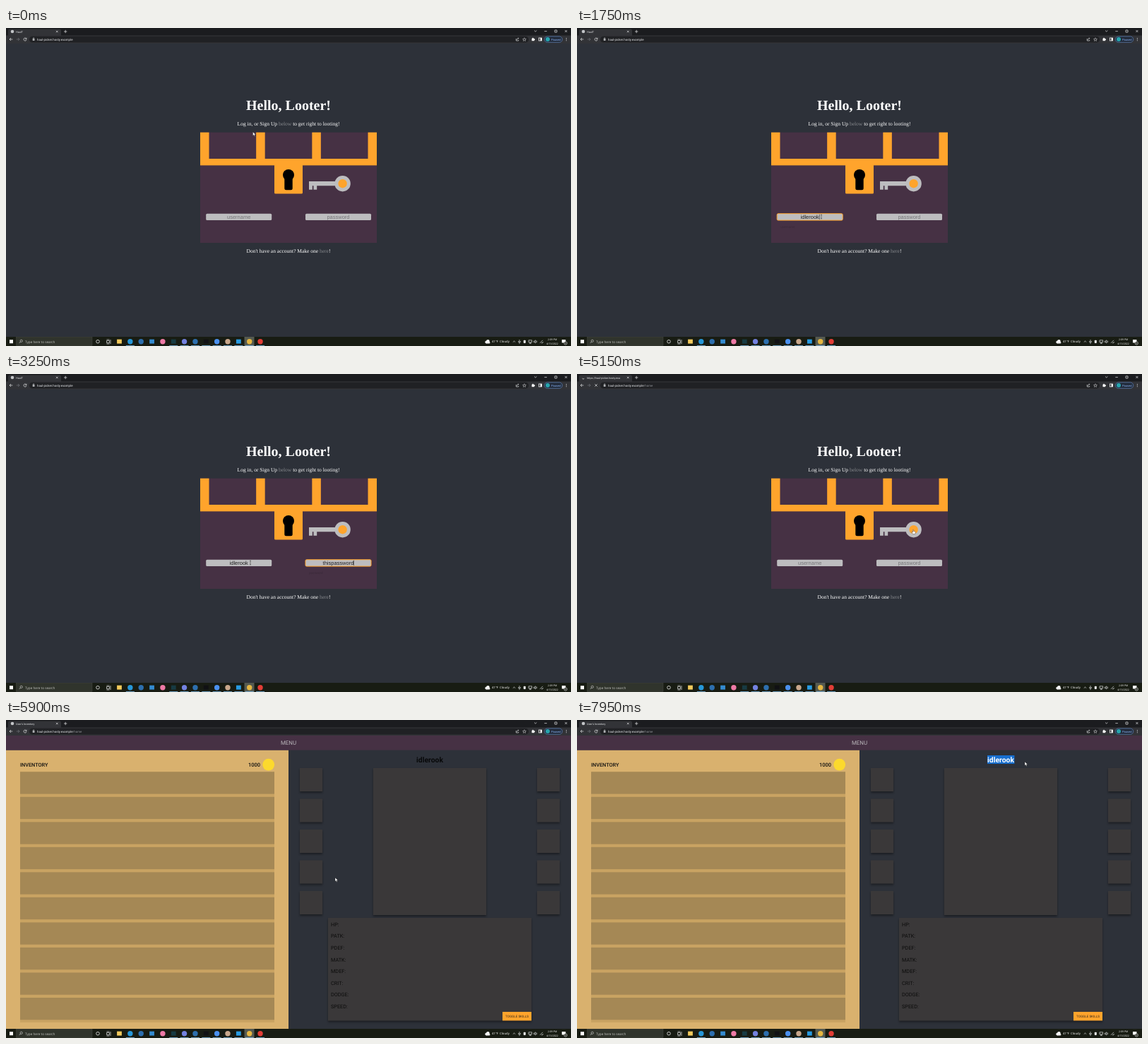
These frames come from a looping animation (800 px wide and 450 px high, 8000 ms). An HTML page:

```html
<!DOCTYPE html>
<html lang="en">
<head>
<meta charset="utf-8">
<title>Treasure login</title>
<style>
html, body { margin: 0; width: 100%; height: 100%; overflow: hidden; background: #2d3139; }
svg { display: block; width: 100vw; height: 100vh; }
text { font-family: Roboto, sans-serif; text-rendering: geometricPrecision; white-space: pre; }
.serif { font-family: "Liberation Serif", serif; }
.arial { font-family: "Liberation Sans", sans-serif; }
.ui { font-family: "Open Sans", sans-serif; }
.line { fill: none; stroke: #e4e5e7; stroke-width: .7; }
.shadow { filter: drop-shadow(0 2px 1.5px rgba(0, 0, 0, .4)); }
</style>
</head>
<body>
<svg id="stage" viewBox="0 0 800 450"></svg>
<script>
const LOOP = 8000;
const HOST = 'haul-picker.hosty.example';
const USER = 'idlerook';
const PASSWORD = 'thispassword';
const PLUM = '#463144', ORANGE = '#ffa42c', SILVER = '#bdbdbf', PANEL = '#3a3839';

const rect = (x, y, w, h, fill, extra = '') =>
  `<rect x="${x}" y="${y}" width="${w}" height="${h}" fill="${fill}" ${extra}/>`;
const circle = (x, y, r, fill, extra = '') =>
  `<circle cx="${x}" cy="${y}" r="${r}" fill="${fill}" ${extra}/>`;
const line = (d, extra = '') => `<path class="line" d="${d}" ${extra}/>`;
const text = (x, y, size, content, fill, extra = '') =>
  `<text x="${x}" y="${y}" font-size="${size}" fill="${fill}" ${extra}>${content}</text>`;
const centered = (x, y, size, content, fill, extra = '') =>
  text(x, y, size, content, fill, `text-anchor="middle" ${extra}`);
const repeat = (n, make) => Array.from({ length: n }, (_, i) => make(i)).join('');

function browser() {
  return rect(0, 0, 800, 11, '#1b1c1f') +
    rect(3, 1.5, 75, 12, '#323337', 'rx="2.5"') +
    rect(0, 10.5, 800, 11.5, '#323337') +
    rect(33, 11.8, 707, 8.8, '#202124', 'rx="4.4"') +
    `<g id="favicon">${circle(9, 5, 2.3, '#c3c5c8')}</g>` +
    line('M11 5A2 2 0 0 1 9 7', 'id="spinner"') +
    text(14, 6.5, 3.75, '', '#e4e5e7', 'id="tabTitle"') +
    line('M71 3.8l2.5 2.5m0-2.5l-2.5 2.5M82 5h4.4m-2.2-2.2v4.4') +
    line('M748 3.5l1.7 1.6 1.7-1.6M762.3 4.6h3.6M777 3h3v3h-3zM791.4 3l3 3m0-3l-3 3') +
    line('M9.3 16H5m2-2l-2 2 2 2') +
    line('M14.8 16h4.3m-2-2l2 2-2 2', 'id="forward"') +
    line('M28.6 14.8A2 2 0 1 0 29 16.5M29 13.8v1.7h-1.7', 'id="reload"') +
    line('M25.3 14.3l3.4 3.4m0-3.4l-3.4 3.4', 'id="stop"') +
    rect(37.7, 15.5, 2.8, 2.3, '#c3c5c8') + line('M38.3 15.5v-1.1q.8-1 1.6 0v1.1', 'stroke-width=".5"') +
    text(44, 17.6, 4.4, `${HOST}<tspan id="path" fill="#8f9297"></tspan>`, '#e8eaed') +
    line('M722.3 15v3h3.4v-1m-2-.4q.2-2 2-2m-.9-.9l1 .9-1 1') +
    line('M734 13.8l.7 1.6 1.7.2-1.3 1.1.4 1.7-1.5-.9-1.5.9.4-1.7-1.3-1.1 1.7-.2z', 'style="stroke-width:.5"') +
    rect(744.5, 14.8, 3.6, 3.4, '#fff') + circle(746, 14.6, .8, '#fff') + circle(748.3, 16.3, .8, '#fff') +
    rect(754.5, 14, 4, 4, 'none', 'stroke="#fff" stroke-width=".7"') + rect(756.6, 14, 2, 4, '#fff') +
    rect(762.3, 11.9, 25.4, 8.4, '#222b3a', 'rx="4.2" stroke="#668fce" stroke-width=".6"') +
    circle(767, 16.1, 3, '#27a4ad') + text(772, 17.6, 4.1, 'Paused', '#8ab4f8') +
    repeat(3, i => circle(793.3, 14.4 + i * 1.7, .5, '#e4e5e7'));
}

function taskbar() {
  const apps = ['#f3ca5c', '#2697d8', '#2d6fae', '#348bd0', '#ef7aa6', '#173b43', '#7381df',
    '#2d6fae', '#101114', '#4b91ef', '#c9a78b', '#279be2', '#e6b741', '#e23d36'];
  return rect(0, 437, 800, 13, '#181c13') +
    rect(5, 441.2, 5, 5, '#fff') +
    rect(14.5, 437.5, 107.5, 12, '#30342c', 'stroke="#50534c" stroke-width=".4"') +
    circle(21.7, 442.8, 1.6, 'none', 'stroke="#ddd" stroke-width=".6"') + line('M20.6 444l-1.7 1.8') +
    text(27, 445.6, 4.65, 'Type here to search', '#c7c8c4', 'class="ui"') +
    circle(130, 443.7, 2.3, 'none', 'stroke="#fff" stroke-width=".7"') +
    line('M142.5 442.5h4v3h-4zM142.5 441h4M142.5 447h4M148 441v6') +
    rect(337.5, 437, 14, 13, '#555a51') +
    apps.map((color, i) => {
      const x = 160.5 + i * 15.35;
      const shape = i === 0 || i === 3 || i === 5 || i === 8 || i === 11
        ? rect(x - 3.4, 440.6, 6.8, 6, color) : circle(x, 443.7, 3.7, color);
      return shape + (i === 1 || i > 4 ? rect(x - 6, 449.2, 12, .8, '#83bce7') : '');
    }).join('') +
    circle(680.3, 444.4, 2, '#eee') + circle(682.4, 443.4, 2.3, '#fff') + rect(679.8, 444, 5.5, 2.4, '#eee', 'rx="1.2"') +
    text(688, 445.4, 4.3, '41°F', '#fff', 'class="ui"') + text(699, 445.4, 4.3, 'Cloudy', '#fff', 'class="ui"') +
    line('M717.8 444.6l1.7-1.6 1.7 1.6M727 441v3m-1.3-1v1.5h2.6V443M727 445v2') +
    rect(732.8, 441.7, 3, 4.4, '#eee', 'rx=".8"') +
    line('M740 441.8h4.6v3H740zm2.3 3v1.5m-1.5 0h3M747.4 443v1.7h1l1.4 1.1v-4l-1.4 1.2zM751 442.4q1.2 1.4 0 2.8M756 445.8l4-4m-2 4q2.6.2 2.5-1.8') +
    centered(773.6, 442.4, 3.5, '2:09 PM', '#fff', 'class="ui"') +
    centered(773.6, 448.2, 3.5, '4/13/2022', '#fff', 'class="ui"') +
    rect(787, 441, 5.4, 4.4, '#fff') + circle(792.3, 446, 2.2, '#22261e', 'stroke="#fff" stroke-width=".5"') +
    centered(792.3, 447.2, 3, '2', '#fff');
}

const field = (id, x) =>
  rect(x, 262.7, 93, 9.4, SILVER, `rx="1.6" id="${id}Box"`) +
  centered(x + 46.5, 269.9, 7.5, '', '#222', `class="arial" id="${id}Text"`) +
  rect(0, 263.7, .5, 7.4, '#111', `id="${id}Caret"`) +
  text(x + 5, 282.8, 4.6, id, '#3a2a39', `class="arial" id="${id}Hint"`);

function loginPage() {
  const link = word => `<tspan fill="#85878c">${word}</tspan>`;
  return centered(400, 116, 20, 'Hello, Looter!', '#fff', 'class="serif" font-weight="700"') +
    centered(400, 138, 7.5, `Log in, or Sign Up ${link('below')} to get right to looting!`, '#fff', 'class="serif"') +
    rect(275, 147.7, 250, 156.3, PLUM) +
    repeat(4, i => rect(275 + i * 79.17, 147.7, 12.5, 46, ORANGE)) +
    rect(275, 185, 250, 9.4, ORANGE) +
    rect(380, 193, 40, 41.5, ORANGE, 'rx="1.6"') +
    circle(400, 208, 8, '#000') + rect(394.3, 208, 11.4, 21.2, '#000', 'rx="2.5"') +
    `<path fill="${SILVER}" d="M429 217h40v6.3h-28.8v5.4h-4.7v-5.4h-1.7v5.4H429z"/>` +
    circle(476.6, 220.2, 11.2, SILVER) + circle(476.6, 220.2, 6.2, ORANGE) +
    field('username', 283.2) + field('password', 424) +
    centered(400, 317.8, 7.5, `Don't have an account? Make one ${link('here')}!`, '#fff', 'class="serif"');
}

function menuPage() {
  const entry = (y, label) => centered(400, y, 9.8, label, '#b9b6ba');
  return rect(240, 22, 320, 146, PLUM) + rect(0, 167.3, 800, 21, PLUM) +
    centered(549, 36.3, 8, 'X', '#b9b6ba') +
    entry(61, 'LOG OUT') + entry(91, 'HAUL PICKER') + entry(121, 'VENDOR') +
    centered(400, 180.6, 7.9, 'MENU', '#b9b6ba') +
    centered(613.5, 204.2, 15.5, 'X', '#08090a', 'font-weight="500"') +
    centered(290, 227.8, 10.9, 'YOUR ITEMS', '#fff', 'font-weight="700"') +
    centered(510, 227.8, 10.9, 'VENDOR', '#fff', 'font-weight="700"') +
    rect(180, 233, 440, 204, '#555251');
}

function inventoryPage() {
  const stats = ['HP', 'PATK', 'PDEF', 'MATK', 'MDEF', 'CRIT', 'DODGE', 'SPEED'];
  const slot = (x, y, w, h) => rect(x, y, w, h, PANEL, 'class="shadow"');
  return rect(0, 42.5, 400, 394.5, '#d9b16e') +
    rect(0, 22, 800, 20.6, PLUM) + centered(400, 35.2, 7.9, 'MENU', '#b9b6ba') +
    text(20, 65.8, 7.3, 'INVENTORY', '#111', 'font-weight="500"') +
    text(360, 65.8, 7.5, '1000', '#111', 'text-anchor="end" font-weight="500"') +
    circle(371.7, 63.2, 8.4, '#fcd92d') +
    rect(20, 73.3, 360, 354.7, '#c9a362') +
    repeat(10, i => rect(20, 73.3 + i * 35.52, 360, 31.3, '#a58855')) +
    rect(581, 50, 38.4, 12, '#176fd0', 'id="selection"') +
    centered(600, 59.9, 10.4, USER, '#08090a', 'id="heroName" font-weight="600"') +
    repeat(5, i => slot(416, 68 + i * 43.5, 32, 33) + slot(752, 68 + i * 43.5, 32, 33)) +
    slot(520, 68, 160, 208) + slot(456, 280, 288, 145.5) +
    stats.map((name, i) => text(460, 291.7 + i * 16.6, 7.3, name + ':', '#0c0c0c')).join('') +
    rect(703, 413, 41, 12.4, ORANGE) + centered(723.5, 420.9, 4.6, 'TOGGLE SKILLS', '#33291c');
}

document.getElementById('stage').innerHTML =
  rect(0, 0, 800, 450, '#2d3139') +
  `<g id="login">${loginPage()}</g><g id="menu">${menuPage()}</g><g id="inventory">${inventoryPage()}</g>` +
  browser() + taskbar() +
  `<g id="pointer">
    <path id="arrow" d="M0 0v5.4l1.3-1.1.9 2 1-.4-.9-2h1.7z" fill="#fff" stroke="#111" stroke-width=".35"/>
    <path id="beam" d="M-1-2.8h2M0-2.8v5.6M-1 2.8h2" fill="none" stroke="#222" stroke-width=".5"/>
    <path id="hand" d="M-.5 0q.6-.6 1.1 0v2l2.3.6q.6.3.4 1.2l-.5 2.2h-3.2l-2-2.8q.4-.7 1.9.3z" fill="#fff" stroke="#111" stroke-width=".35"/>
  </g>`;

const el = Object.fromEntries([...document.querySelectorAll('[id]')].map(node => [node.id, node]));
const show = (node, on) => { node.style.display = on ? '' : 'none'; };
const setText = (node, value) => { if (node.textContent !== value) node.textContent = value; };
const clamp01 = v => Math.min(1, Math.max(0, v));
const ease = v => v * v * (3 - 2 * v);

// Pointer stops: time, x, y
const stops = [[0, 349.5, 147], [150, 349.5, 147], [700, 346, 267], [3550, 346, 267], [4350, 476, 220.5],
  [5720, 476, 220.5], [5900, 466, 223], [6550, 505, 205], [7000, 580, 58], [7180, 580, 58],
  [7650, 630, 59], [7900, 634, 59], [LOOP, 634, 59]];

function pointerAt(t) {
  const i = Math.max(1, stops.findIndex(stop => t < stop[0]));
  const [t0, x0, y0] = stops[i - 1], [t1, x1, y1] = stops[i];
  const k = ease((t - t0) / (t1 - t0));
  return [x0 + (x1 - x0) * k, y0 + (y1 - y0) * k];
}

function drawField(id, value, focused, caretOn) {
  const label = el[id + 'Text'], box = el[id + 'Box'], caret = el[id + 'Caret'];
  const placeholder = !value;
  setText(label, value || id);
  label.setAttribute('fill', placeholder ? '#77777a' : '#222');
  box.setAttribute('stroke', focused ? ORANGE : 'none');
  show(el[id + 'Hint'], focused && value);
  show(caret, focused && caretOn);
  const width = placeholder ? 0 : label.getComputedTextLength();
  caret.setAttribute('x', +label.getAttribute('x') + width / 2 + .1);
}

function render(t) {
  const loading = t >= 4900 && t < 5300;
  const home = t >= 4900, inventory = t >= 5300;
  show(el.login, t < 5200);
  show(el.menu, t >= 5200 && !inventory);
  show(el.inventory, inventory);

  setText(el.tabTitle, inventory ? "User's Inventory" : home ? `https://${HOST}`.slice(0, 29) : 'HaulT');
  setText(el.path, home ? '/home' : '');
  show(el.favicon, !loading);
  show(el.spinner, loading);
  show(el.stop, loading);
  show(el.reload, !loading);
  el.spinner.setAttribute('transform', `rotate(${t * .36} 9 5)`);
  el.forward.style.stroke = '#75777b';

  const typed = (word, start, step) => t < 4850 ? word.slice(0, Math.max(0, Math.floor((t - start) / step))) : '';
  const nameFocus = t >= 800 && t < 2050, passFocus = t >= 2050 && t < 4500;
  if (t < 5200) {
    drawField('username', typed(USER, 900, 90), nameFocus, (t - 1650) % 1000 < 500);
    drawField('password', typed(PASSWORD, 2150, 80), passFocus, t < 3200 || (t - 3200) % 1000 < 500);
  }

  const [x, y] = pointerAt(t);
  const overField = t < 5200 && x > 283 && x < 376 && y > 262 && y < 272;
  const overKey = t < 5200 && Math.hypot(x - 476.6, y - 220.2) < 11;
  el.pointer.setAttribute('transform', `translate(${x} ${y})`);
  show(el.beam, overField);
  show(el.hand, overKey);
  show(el.arrow, !overField && !overKey);

  const selected = t >= 7180 ? clamp01((x - 581) / 38.4) : 0;
  el.selection.setAttribute('width', 38.4 * selected);
  el.heroName.setAttribute('fill', selected > .5 ? '#fff' : '#08090a');
}

let start;
function frame(now) {
  start ??= now;
  render((now - start) % LOOP);
  requestAnimationFrame(frame);
}
render(0);
requestAnimationFrame(frame);
</script>
</body>
</html>
```
